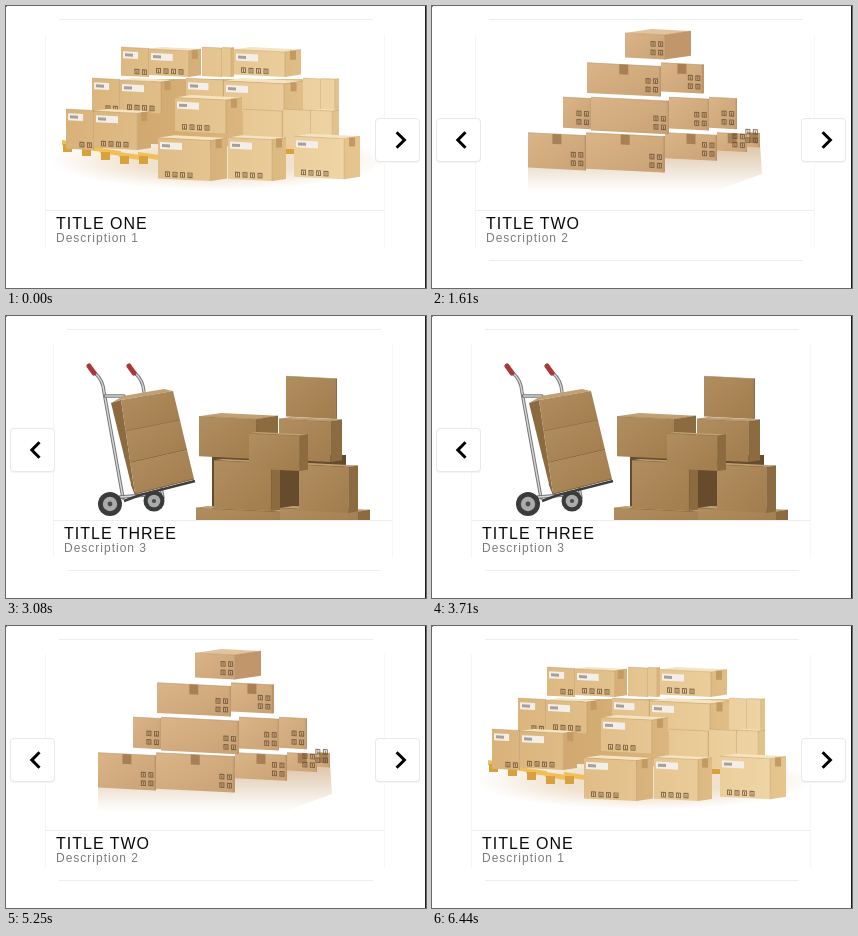
Animation of 420x282 px, one loop 6790 ms. Source, as an HTML page:

```html
<!DOCTYPE html>
<html lang="en">
<head>
<meta charset="utf-8">
<title>Box carousel</title>
<style>
html, body { margin: 0; width: 100%; height: 100%; overflow: hidden; background: #fff; }
svg { display: block; width: 100vw; height: 100vh; }
text { font-family: "Liberation Sans", Arial, sans-serif; letter-spacing: 1px; }
</style>
</head>
<body>
<svg id="stage" viewBox="0 0 420 282"></svg>
<script>
const LOOP = 6790, PITCH = 360, SLIDE_MS = 600;
// [start time, slide to show]
const MOVES = [[1089, 1], [2594, 2], [4368, 1], [5802, 0]];

const poly = (fill, ...p) => `<polygon points="${p.join(' ')}" fill="${fill}"/>`;
const rect = (x, y, w, h, fill, more = '') =>
  `<rect x="${x}" y="${y}" width="${w}" height="${h}" fill="${fill}" ${more}/>`;
const line = (d, color, width, more = '') =>
  `<path d="${d}" fill="none" stroke="${color}" stroke-width="${width}" ${more}/>`;
const shift = (x, y, inner) => `<g transform="translate(${x} ${y})">${inner}</g>`;
const mix = (p, q, k) => p.map((v, i) => v + (q[i] - v) * k);

const LIGHT = { front: 'url(#light)', side: 'url(#lightSide)', top: '#f6e3bf', tape: '#c39a61', edge: '#a97f4a' };
const WARM = { front: 'url(#warm)', side: '#c0966a', top: '#e2c39b', tape: '#a98056', edge: '#966c40' };
const DARK = { front: 'url(#dark)', side: '#8c6b41', top: '#c0a074', tape: '#9b7849', edge: '#7b5d38' };

// A block of handling marks, cols by rows, ending at the corner (x, y).
function marks(x, y, cols, rows) {
  let d = '';
  for (let i = 0; i < cols * rows; i++) {
    d += `M${x - 6 - (i % cols) * 7.5} ${y - 7 - Math.floor(i / cols) * 8.5}h4v4.5h-4zm2 1v3`;
  }
  return line(d, '#5c452c', 1, 'opacity=".7"');
}

// Box inside the bounds x, y, w, h; front is the front face's share of the width.
// deco: t tape, l label, i row of marks, s square of marks.
function crate(c, x, y, w, h, front, deco = '') {
  const fw = w * front, sw = w - fw, l = fw * .05, r = sw * .15;
  const m = x + fw, b = x + w, my = y + l + r, end = y + h;
  const k = s => deco.includes(s);
  let face = '';
  if (k('t')) face += rect(fw / 2 - 4, 0, 9, 10, c.tape);
  if (k('l')) face += rect(2, 4, Math.min(22, fw * .55), 7, '#f3efe8') + rect(4, 6, 8, 3, '#a5a09a');
  if (k('i')) face += marks(Math.min(fw, 36), h - l - r, fw > 36 ? 4 : 2, 1);
  if (k('s')) face += marks(fw, h - l - r - 2, 2, 2);
  return poly(c.top, x, y + r, m, my, b, y + l, b - fw, y)
    + poly(c.front, x, y + r, m, my, m, end, x, end - l)
    + poly(c.side, m, my, b, y + l, b, end - r, m, end)
    + line(`M${x} ${y + r}L${m} ${my}L${b} ${y + l}M${m} ${my}V${end}`, c.edge, .6, 'opacity=".5"')
    + `<g transform="matrix(1 .05 0 1 ${x} ${y + r})">${face}</g>`
    + (c === LIGHT && sw > 9 ? rect(m + sw / 2 - 3, my - r / 2, 6, 9, c.tape) : '');
}

// Boxes side by side between the given edges.
function row(c, y, height, edges, front, deco) {
  return edges.slice(1).map((b, i) => {
    const w = b - edges[i], last = i === edges.length - 2;
    return crate(c, edges[i], y, w, height(w, b), last ? front : .98, deco);
  }).join('');
}

function palletStacks() {
  const tier = (level, edges, deco = 'li') => row(LIGHT, 41 + 31 * level, () => 30 + 5.5 * level, edges, .76, deco);
  let pallet = '';
  for (let i = 0; i < 5; i++) {
    const x = 56 + i * 19, y = 134 + Math.min(i, 3) * 4;
    pallet += poly('#f0bf58', x, y, x + 21, y + 3, x + 21, y + 8, x, y + 5) + rect(x + 1, y + 4, 9, 8, '#d9a03e');
  }
  return '<ellipse cx="212" cy="155" rx="168" ry="29" fill="url(#glow)"/>'
    + poly('url(#lightSide)', 145, 73, 297, 73, 297, 127, 280, 142, 145, 138)
    + pallet + rect(278, 138, 11, 10, '#d9a03e')
    + tier(0, [196, 216, 228], '') + tier(0, [115, 143, 195]) + tier(0, [228, 295])
    + tier(1, [297, 315, 333], '') + tier(1, [86, 114, 168]) + tier(1, [180, 218, 297], 'l')
    + tier(2, [237, 277, 305, 333], '') + tier(2, [60, 88, 145])
    + tier(1.55, [169, 236]) + tier(2.85, [222, 280]) + tier(2.85, [152, 221]) + tier(2.8, [288, 354]);
}

function pyramid() {
  const levels = [[189, 255], [151, 225, 268], [127, 155, 233, 273, 301], [92, 150, 229, 281, 311, 324]];
  const recede = b => Math.max(0, b - 240) * .22;
  const boxes = levels.map((edges, i) => {
    const height = (w, b) => 24 + 2.7 * i + w * .1 - (i === 3 ? recede(b) : 0);
    return row(WARM, 23 + 33 * i + i * i * .5, height, edges, i ? .95 : .6, i % 2 ? 'ts' : 's');
  });
  return poly('url(#mirror)', 92, 158, 324, 138, 326, 168, 280, 185, 92, 185) + boxes.reverse().join('');
}

function handTruck() {
  const tube = d => line(d, '#77797b', 3.4, 'stroke-linecap="round"') + line(d, '#d5d7d9', 1.4);
  const grip = line('M75 50L80 57', '#a9383b', 5, 'stroke-linecap="round"');
  const wheel = (x, y, r) => ['#3b3b3b', '#a9abad', '#4b4b4b']
    .map((c, i) => `<circle cx="${x}" cy="${y}" r="${r * (1 - i * .4)}" fill="${c}"/>`).join('');
  const rail = tube('M81 57Q89 64 90 76L109 182') + grip;
  const cart = shift(40, 0, rail) + rail + tube('M91 80H110') + tube('M106 181L146 178')
    + wheel(140, 185, 10.5) + wheel(96, 188, 12) + line('M110 185L126 179L181 165', '#3d3d3d', 2.5);

  // Three boxes leaning along the rails.
  const left = [[97, 87], [117, 168]], mid = [[107, 84], [121, 178]], right = [[159, 75], [180, 163]];
  const at = (side, k) => mix(side[0], side[1], k);
  let load = poly(DARK.top, left[0], 109, 80, 150, 73, right[0], mid[0]);
  for (let i = 0; i < 3; i++) {
    const a = i / 3, b = (i + 1) / 3;
    load += poly(DARK.side, at(left, a), at(mid, a), at(mid, b), at(left, b))
      + poly(DARK.front, at(mid, a), at(right, a), at(right, b), at(mid, b))
      + line(`M${at(left, b)}L${at(mid, b)}L${at(right, b)}`, DARK.edge, 1);
  }

  const bx = (...p) => crate(DARK, ...p);
  const pile = rect(198, 139, 134, 65, '#664b2d')
    + bx(265, 101, 63, 45, .82) + bx(272, 60, 51, 43, .97) + bx(185, 97, 79, 46, .72)
    + bx(182, 190, 98, 24, .88) + bx(266, 190, 90, 24, .86)
    + bx(200, 143, 66, 52, .87) + bx(285, 147, 59, 50, .84) + bx(235, 116, 59, 39, .86);
  return cart + load + pile;
}

function card(i, picture, title) {
  const c = '#eeeeee';
  return shift(i * PITCH, 0, `<g clip-path="url(#photo)">${picture}</g>`
    + rect(53, 13, 314, 1, c) + rect(39, 204, 340, 1, c) + rect(53, 254, 314, 1, c, 'class="foot"')
    + rect(39, 28, 1, 214, '#f5f5f5') + rect(378, 28, 1, 214, '#f7f7f7')
    + `<text x="50" y="223" font-size="16" fill="#0a0a0a">${title}</text>`
    + `<text x="50" y="236" font-size="12" fill="#7c7c7c">Description ${i + 1}</text>`);
}

function button(id, x, chevron) {
  return `<g id="${id}">` + shift(x, 112, rect(0, 1, 45, 44, '#f4f4f4', 'rx="4"')
    + rect(.5, .5, 44, 43, '#fff', 'rx="3.5" stroke="#e8e8e8"')
    + line(chevron, '#000', 3)) + '</g>';
}

const fade = (id, from, to, more = 'x2="1" y2="1"') =>
  `<linearGradient id="${id}" ${more}><stop stop-color="${from}"/><stop offset="1" stop-color="${to}"/></linearGradient>`;
const across = 'gradientUnits="userSpaceOnUse" x1="60" x2="350"';

const stage = document.getElementById('stage');
stage.innerHTML = '<defs>'
  + fade('light', '#d9b27a', '#f0d6a6', across) + fade('lightSide', '#c99f66', '#e6c48e', across)
  + fade('warm', '#dab588', '#c9a174') + fade('dark', '#b18e60', '#a17c4d')
  + fade('mirror', '#dcc3a6', '#ffffff', 'x2="0" y2="1"')
  + '<radialGradient id="glow"><stop offset=".5" stop-color="#f0e2cf"/><stop offset="1" stop-color="#fff"/></radialGradient>'
  + '<clipPath id="view"><rect x="29" y="0" width="360" height="282"/></clipPath>'
  + '<clipPath id="photo"><rect x="40" y="14" width="338" height="190"/></clipPath></defs>'
  + rect(0, 0, 420, 282, '#fff')
  + '<g clip-path="url(#view)"><g id="track">'
  + card(0, palletStacks(), 'TITLE ONE') + card(1, pyramid(), 'TITLE TWO') + card(2, handTruck(), 'TITLE THREE')
  + '</g></g>'
  + button('prev', 4, 'M29.5 14.2L21.8 22L29.5 29.8') + button('next', 369, 'M21.6 14.2L29.4 22L21.6 29.8')
  + rect(419, 0, 1, 282, '#1b1b20') + rect(0, 0, 1, 1, '#777');

const track = document.getElementById('track');
const prev = document.getElementById('prev');
const next = document.getElementById('next');
const feet = document.querySelectorAll('.foot');
const show = (el, on) => el.setAttribute('visibility', on ? 'visible' : 'hidden');

// cubic-bezier(.25, .1, .25, 1)
function ease(x) {
  if (x <= 0) return 0;
  if (x >= 1) return 1;
  let lo = 0, hi = 1;
  for (let i = 0; i < 24; i++) {
    const u = (lo + hi) / 2;
    if (.75 * u * (1 - u) + u ** 3 < x) lo = u; else hi = u;
  }
  return .3 * lo * (1 - lo) ** 2 + 3 * (1 - lo) * lo * lo + lo ** 3;
}

function draw(t) {
  let pos = 0, at = 0;
  for (const [start, to] of MOVES) {
    pos += (to - at) * ease((t - start) / SLIDE_MS);
    if (t >= start) at = to; else break;
  }
  track.setAttribute('transform', `translate(${-Math.round(pos * PITCH)} 0)`);
  show(prev, t >= 1050 && t < 5802);
  show(next, at !== 2);
  feet.forEach(f => show(f, t >= 70));
}

const begin = performance.now();
function tick() {
  draw((performance.now() - begin) % LOOP);
  requestAnimationFrame(tick);
}
tick();
</script>
</body>
</html>
```
